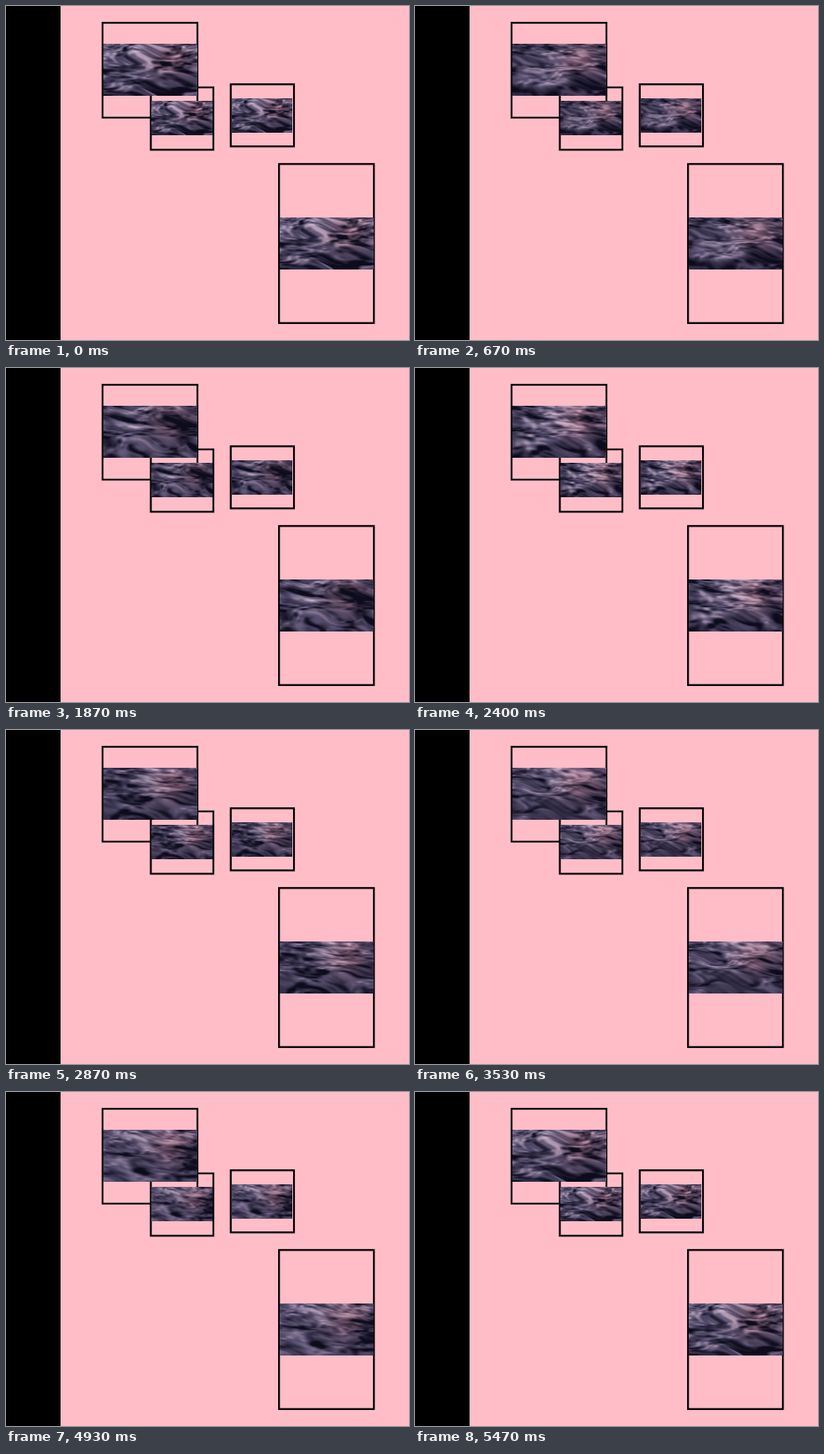
Recreate the animation shown at these times as an HTML page with a canvas. Size 480 by 398 pixels, loop 5540 ms.

```html
<!DOCTYPE html>
<html lang="en">
<head>
<meta charset="utf-8">
<title>Sea windows</title>
<style>
html, body { margin: 0; width: 100%; height: 100%; overflow: hidden; background: #ffbdc8; }
canvas { display: block; width: 480px; height: 398px; }
</style>
</head>
<body>
<canvas id="stage" width="480" height="398"></canvas>
<script>
const LOOP = 5540, STEPS = 83, STEP = 200 / 3;
const ctx = document.getElementById('stage').getContext('2d');

// Frames and the sea strip inside each: x, y, width, height
const boxes = [
  { frame: [115, 20, 113, 113], sea: [116, 45, 111.5, 62] },
  { frame: [172.5, 97, 74.5, 74.3], sea: [173.2, 113.3, 72.8, 40.7] },
  { frame: [267.7, 93.3, 75.3, 74], sea: [268.5, 110, 72.7, 41] },
  { frame: [325.2, 188.3, 113, 189.5], sea: [326, 251.5, 111.7, 62] }
];

const W = 168, H = 93;
const sea = document.createElement('canvas');
sea.width = W;
sea.height = H;
const seaCtx = sea.getContext('2d');
const pixels = seaCtx.createImageData(W, H);

let seed = 7;
const random = () => (seed = (seed * 16807) % 2147483647) / 2147483647;
const values = Float32Array.from({ length: 256 }, random);
const order = Uint8Array.from({ length: 256 }, (_, i) => i);
for (let i = 255; i > 0; i--) {
  const j = Math.floor(random() * (i + 1));
  [order[i], order[j]] = [order[j], order[i]];
}

const mix = (a, b, k) => a + (b - a) * k;
const clamp = v => Math.max(0, Math.min(1, v));
const ease = v => v * v * (3 - 2 * v);
const glow = (x, y, cx, cy, rx, ry) => Math.exp(-(((x - cx) / rx) ** 2) - ((y - cy) / ry) ** 2);

function plane(x, y, z) {
  const xi = Math.floor(x), yi = Math.floor(y);
  const fx = ease(x - xi), fy = ease(y - yi);
  const at = (i, j) => values[order[(order[(order[z & 255] + j) & 255] + i) & 255]];
  return mix(mix(at(xi, yi), at(xi + 1, yi), fx),
             mix(at(xi, yi + 1), at(xi + 1, yi + 1), fx), fy);
}

// Smooth noise that repeats after `cycle` cells of time
function noise(x, y, phase, cycle, layer) {
  const z = phase * cycle, zi = Math.floor(z);
  const a = layer + zi % cycle, b = layer + (zi + 1) % cycle;
  return mix(plane(x, y, a), plane(x, y, b), ease(z - zi));
}

function paintSea(phase) {
  const data = pixels.data;
  const sway = Math.sin(phase * 2 * Math.PI);
  for (let j = 0, p = 0; j < H; j++) {
    const y = j / H;
    for (let i = 0; i < W; i++, p += 4) {
      const x = i / W;
      const swell = noise(x * 3 + 5, y * 5, phase, 6, 0);
      const u = x * (9.5 - 4 * y) + swell * 1.2 + sway * 0.15;
      const v = 25 * y - 8.5 * y * y - 2 * x + swell * 3.4;

      const broad = noise(u * 0.7, v * 0.6, phase, 9, 20);
      const wave = noise(u + 30, v, phase, 12, 40);
      const ripple = noise(u * 2.3 + 60, v * 1.9 + broad * 2, phase, 16, 70);
      const crest = 1 - Math.abs(2 * wave - 1);

      const light = 0.05 * (1 - y)
        + 0.15 * glow(x, y, 0.55, 0.2, 0.42, 0.4)
        + 0.07 * glow(x, y, 0.2, 0.8, 0.25, 0.25)
        - 0.1 * glow(x, y, 1, 0.65, 0.2, 0.6)
        - 0.06 * glow(x, y, 0.6, 1, 0.5, 0.25);
      const tone = clamp(0.24 + light + (broad - 0.5) * 0.5
        + (wave - 0.5) * 0.52 + (ripple - 0.5) * 0.4 + (crest - 0.6) * 0.18);
      const warm = glow(x, y, 0.74, 0.3, 0.24, 0.38);

      const low = clamp(tone / 0.45), high = clamp((tone - 0.45) / 0.45);
      data[p] = mix(mix(13, 88 + 22 * warm, low), 218, high);
      data[p + 1] = mix(mix(12, 80, low), 194 - 18 * warm, high);
      data[p + 2] = mix(mix(29, 111 - 8 * warm, low), 216 - 22 * warm, high);
      data[p + 3] = 255;
    }
  }
  seaCtx.putImageData(pixels, 0, 0);
}

function draw(step) {
  paintSea(step / STEPS);
  ctx.fillStyle = '#ffbdc8';
  ctx.fillRect(0, 0, 480, 398);
  ctx.fillStyle = '#000';
  ctx.fillRect(0, 0, 65, 398);
  ctx.strokeStyle = '#000';
  ctx.lineWidth = 2.2;
  for (const { frame } of boxes) ctx.strokeRect(...frame);
  ctx.imageSmoothingQuality = 'high';
  for (const box of boxes) ctx.drawImage(sea, ...box.sea);
}

let shown = -1;
function tick() {
  const time = performance.now() % LOOP;
  const step = Math.min(STEPS - 1, Math.floor((time + 4) / STEP));
  if (step !== shown) draw(shown = step);
  requestAnimationFrame(tick);
}
tick();
</script>
</body>
</html>
```
